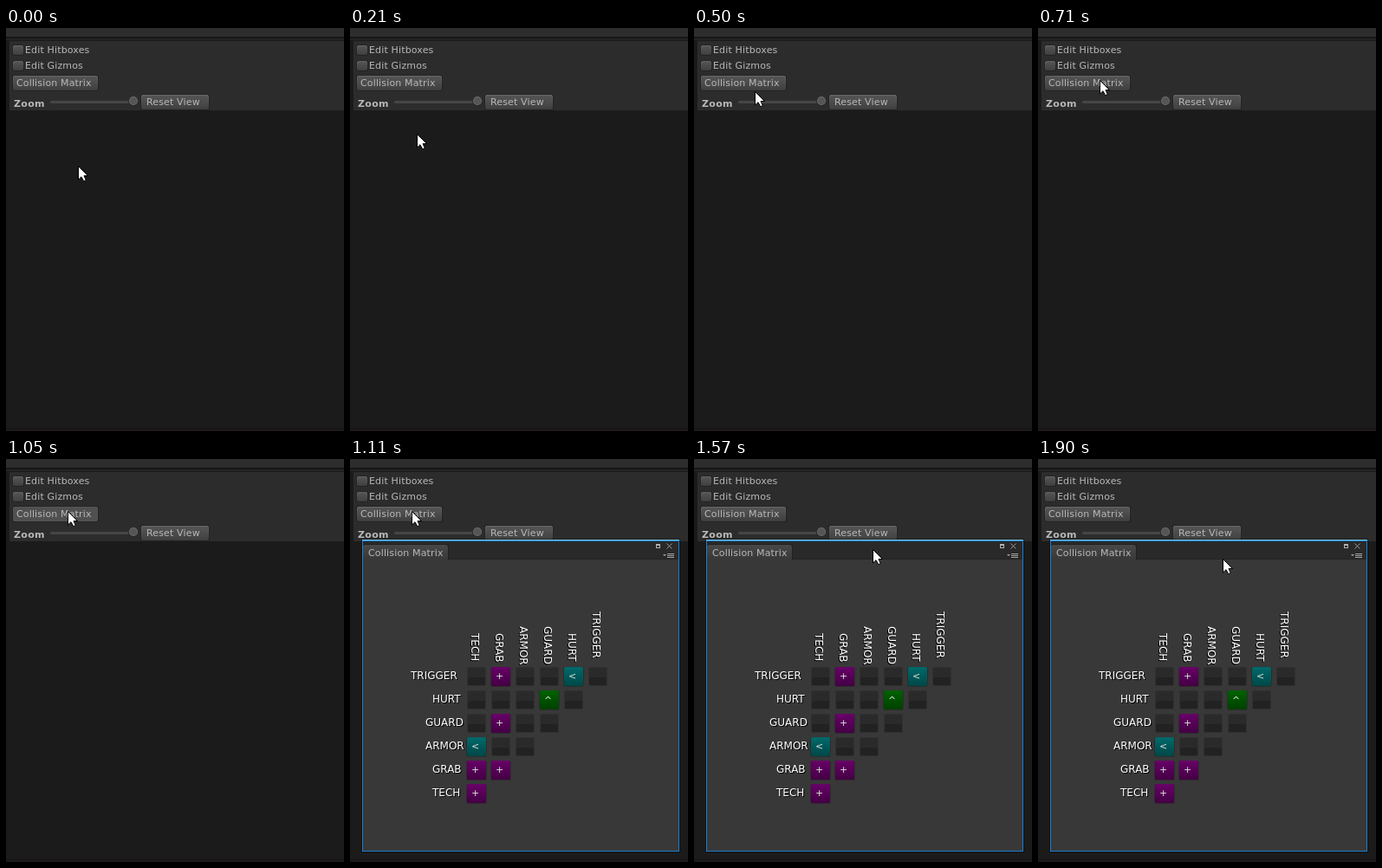
These frames come from a looping animation (390 by 465 pixels, 2.93 s). An HTML page with a canvas:

```html
<!DOCTYPE html>
<html lang="en">
<head>
<meta charset="utf-8">
<title>Collision Matrix</title>
<style>
html, body { margin: 0; width: 100%; height: 100%; overflow: hidden; background: #1b1b1b; }
canvas { display: block; }
</style>
</head>
<body>
<canvas id="stage" width="390" height="465"></canvas>
<script>
const ctx = document.getElementById('stage').getContext('2d');
const LOOP = 2930;
const PRESS = 990;
const OPEN = 1110;
const FONT = '"DejaVu Sans", sans-serif';

// Pointer stops: time, x, y
const PATH = [
  [60, 83, 159], [210, 77, 122], [360, 72, 90], [470, 70, 75], [590, 70, 67],
  [620, 70, 67], [710, 71, 60], [1330, 71, 60], [1420, 111, 73], [1510, 184, 97],
  [1570, 206, 104], [1720, 213, 114], [1899, 213, 114], [1900, 213, 115]
];

const LABELS = [
  ['TRIGGER', 70], ['HURT', 95], ['GUARD', 87], ['ARMOR', 87], ['GRAB', 95], ['TECH', 95]
];
// One character per cell, rows from top to bottom
const MATRIX = ['.+..<.', '...^.', '.+..', '<..', '++', '+'];
const TINTS = {
  '+': ['#680068', '#430043'],
  '<': ['#006a6a', '#004747'],
  '^': ['#006200', '#004000']
};

function rect(x, y, w, h, fill) {
  ctx.fillStyle = fill;
  ctx.fillRect(x, y, w, h);
}

function box(x, y, w, h, r, fill) {
  ctx.fillStyle = fill;
  ctx.beginPath();
  ctx.roundRect(x, y, w, h, r);
  ctx.fill();
}

function shade(y, h, top, bottom) {
  const g = ctx.createLinearGradient(0, y, 0, y + h);
  g.addColorStop(0, top);
  g.addColorStop(1, bottom);
  return g;
}

function text(str, x, y, color = '#b8b8b8', style = '11px', spacing = '0.15px') {
  ctx.font = `${style} ${FONT}`;
  ctx.letterSpacing = spacing;
  ctx.fillStyle = color;
  ctx.fillText(str, x, y);
}

function line(points, color, width = 1) {
  ctx.beginPath();
  points.forEach(([x, y]) => ctx.lineTo(x, y));
  ctx.strokeStyle = color;
  ctx.lineWidth = width;
  ctx.stroke();
}

// Raised control face: dark rim, light top edge, fading downwards
function face(x, y, w, h, pressed) {
  box(x - 1, y - 1, w + 2, h + 2, 3, '#232323');
  box(x, y, w, h, 2, pressed ? '#535353' : shade(y, h, '#666', '#3c3c3c'));
  box(x + 1, y + 1, w - 2, h - 2, 2, pressed ? '#505050' : shade(y, h, '#565656', '#404040'));
}

function button(label, x, y, w, pad, pressed) {
  face(x, y, w, 17, pressed);
  text(label, x + pad, y + 12);
}

function checkbox(label, y) {
  face(8, y + 1, 12, 11);
  text(label, 22, y + 10);
}

function drawInspector(pressed) {
  rect(0, 0, 390, 465, '#1b1b1b');
  rect(0, 0, 390, 10, '#2d2d2d');
  rect(0, 10, 390, 2, '#171717');
  rect(0, 12, 390, 2, '#242424');
  rect(4, 15, 386, 80, '#2c2c2c');
  rect(0, 462, 390, 1, '#131313');
  rect(0, 463, 390, 2, '#211b1c');
  checkbox('Edit Hitboxes', 19);
  checkbox('Edit Gizmos', 37);
  button('Collision Matrix', 8, 55, 98, 4, pressed);
  text('Zoom', 9, 91, '#b8b8b8', 'bold 11px', '0.3px');
  box(51, 84, 100, 3, 1.5, '#464646');
  box(141, 79, 11, 11, 5.5, '#292929');
  box(142, 79, 10, 10, 5, '#6c6c6c');
  box(143, 80, 8, 8, 4, '#555');
  button('Reset View', 156, 77, 78, 6);
}

function drawCell(kind, x, y) {
  if (!TINTS[kind]) {
    box(x, y, 22, 22, 2, '#303030');
    box(x + 1, y + 1, 20, 20, 2, '#2a2a2a');
    box(x + 1, y + 12, 20, 9, 2, '#222');
    return;
  }
  const [top, bottom] = TINTS[kind];
  box(x - 1, y, 24, 23, 3, '#2d2d2d');
  box(x, y, 22, 22, 2, shade(y, 22, top, bottom));
  text(kind, x + 5, y + (kind === '^' ? 15 : 14), '#e0e0e0', '11px', '0px');
}

function label(str, x, y, angle) {
  ctx.save();
  ctx.translate(x, y);
  ctx.rotate(angle);
  text(str, 1, 1, '#000', '12px', '0px');
  text(str, 0, 0, '#fff', '12px', '0px');
  ctx.restore();
}

function drawWindow() {
  box(13, 92, 368, 362, 1, 'rgba(0,0,0,.35)');
  rect(14, 93, 366, 360, '#1c7fd2');
  rect(14, 93, 366, 1, '#7ccbfa');
  rect(15, 95, 364, 357, '#383838');
  rect(15, 95, 364, 21, '#292929');
  rect(15, 115, 364, 1, '#232323');
  box(15, 98, 99, 18, [2, 3, 0, 0], '#1f1f1f');
  box(15, 99, 98, 17, [2, 3, 0, 0], shade(99, 17, '#484848', '#383838'));
  text('Collision Matrix', 21, 112);

  rect(353, 98, 5, 5, '#b0b0b0');
  rect(354, 100, 3, 2, '#292929');
  line([[365.5, 97.5], [371.5, 103.5]], '#999');
  line([[371.5, 97.5], [365.5, 103.5]], '#999');
  for (let i = 0; i < 3; i++) rect(366, 109 + i * 2, 8, 1, '#a5a5a5');
  ctx.fillStyle = '#a5a5a5';
  ctx.beginPath();
  ctx.moveTo(361, 110);
  ctx.lineTo(365, 110);
  ctx.lineTo(363, 112);
  ctx.fill();

  LABELS.forEach(([name, start], i) => {
    label(name, start, 254 + i * 27, 0);
    label(name, 280 - i * 28, start + 106, Math.PI / 2);
  });
  MATRIX.forEach((row, r) =>
    [...row].forEach((kind, c) => drawCell(kind, 135 + c * 28, 240 + r * 27)));
}

function pointerAt(t) {
  const next = PATH.findIndex(p => p[0] > t);
  if (next === 0) return PATH[0].slice(1);
  if (next < 0) return PATH[PATH.length - 1].slice(1);
  const [t0, x0, y0] = PATH[next - 1];
  const [t1, x1, y1] = PATH[next];
  const k = (t - t0) / (t1 - t0);
  return [Math.round(x0 + (x1 - x0) * k), Math.round(y0 + (y1 - y0) * k)];
}

function drawPointer(x, y) {
  const shape = [[.5, .5], [.5, 16], [4, 12.7], [6.7, 17.7], [9.3, 16.6], [7, 11.5], [11.5, 11.5]];
  ctx.beginPath();
  shape.forEach(([dx, dy]) => ctx.lineTo(x + dx, y + dy));
  ctx.closePath();
  ctx.fillStyle = '#fff';
  ctx.fill();
  ctx.strokeStyle = '#000';
  ctx.lineWidth = 1;
  ctx.stroke();
}

function draw(t) {
  drawInspector(t >= PRESS && t < OPEN);
  if (t >= OPEN) drawWindow();
  // The pointer rests for the first 90 ms
  drawPointer(...pointerAt(t < 90 ? 0 : t));
}

let start;
function frame(now) {
  start ??= now;
  draw((now - start) % LOOP);
  requestAnimationFrame(frame);
}
draw(0);
requestAnimationFrame(frame);
</script>
</body>
</html>
```
